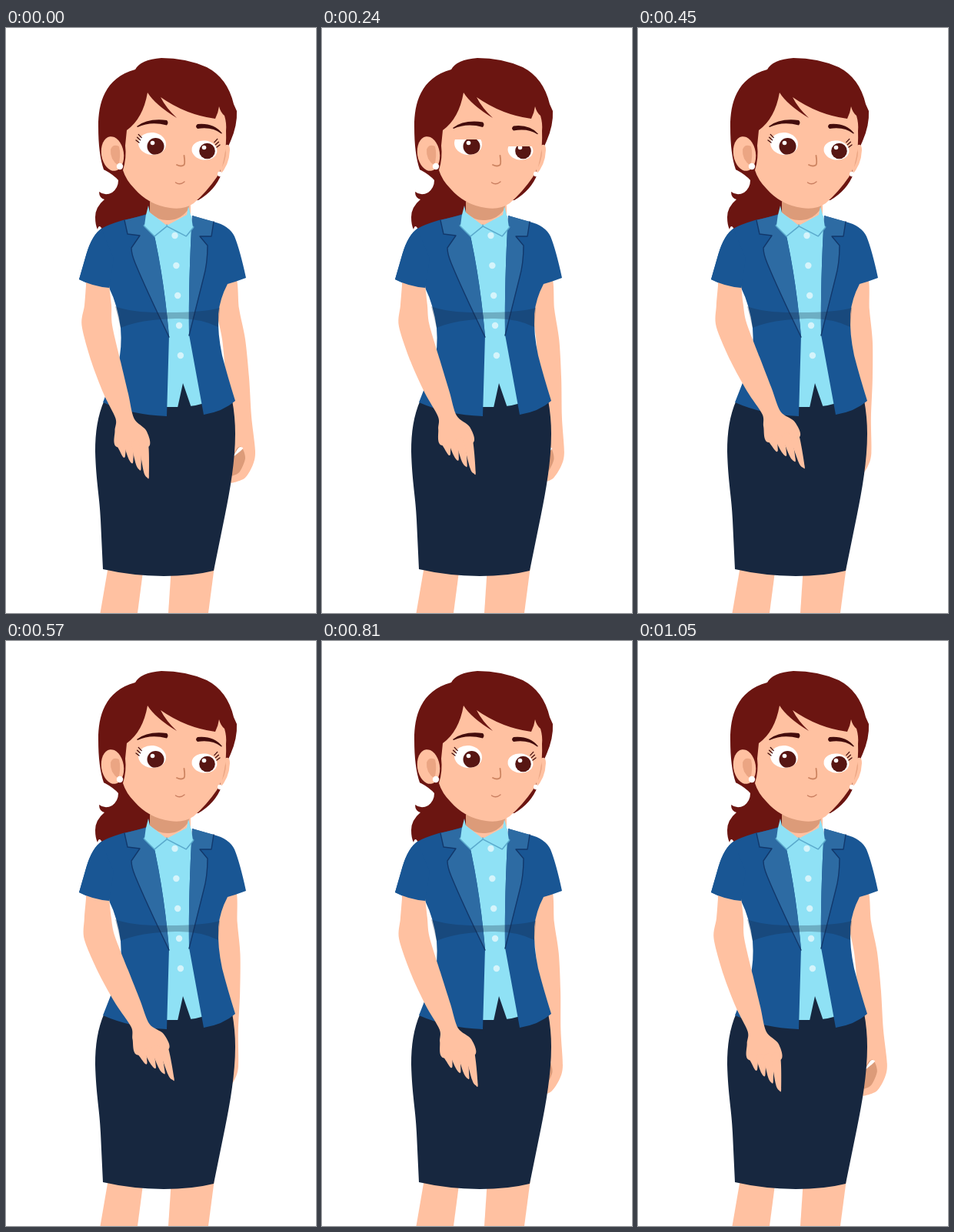
Animation of 403 by 761 pixels, one loop 1.08 s. Source, as an HTML page with a canvas:

```html
<!DOCTYPE html>
<html lang="en">
<head>
<meta charset="utf-8">
<title>Standing woman</title>
<style>
html, body { margin: 0; width: 100%; height: 100%; overflow: hidden; background: #fff; }
canvas { display: block; }
</style>
</head>
<body>
<canvas id="stage" width="403" height="761"></canvas>
<script>
const ctx = document.getElementById('stage').getContext('2d');
const LOOP = 1080, STEP = 30;
const C = {
  hair: '#6b1511', brow: '#430c0c', skin: '#ffc1a1', shade: '#dc9b79', ear: '#eba583',
  jacket: '#195694', lapel: '#2d6ba3', edge: '#12386b',
  shirt: '#8fe1f5', fold: '#5aa9cc', button: '#d5f4fb', skirt: '#17273f', iris: '#571613'
};

function fill(d, color) {
  ctx.fillStyle = color;
  ctx.fill(new Path2D(d));
}

function line(d, color, width) {
  ctx.strokeStyle = color;
  ctx.lineWidth = width;
  ctx.lineCap = ctx.lineJoin = 'round';
  ctx.stroke(new Path2D(d));
}

function oval(x, y, rx, ry, color, turn = 0) {
  ctx.fillStyle = color;
  ctx.beginPath();
  ctx.ellipse(x, y, rx, ry, turn, 0, Math.PI * 2);
  ctx.fill();
}

// Closed smooth curve through the points
function blob(pts, color) {
  const n = pts.length, at = i => pts[(i + n) % n], k = 1 / 7;
  ctx.beginPath();
  ctx.moveTo(...pts[0]);
  for (let i = 0; i < n; i++) {
    const [a, b, c, d] = [at(i - 1), at(i), at(i + 1), at(i + 2)];
    ctx.bezierCurveTo(
      b[0] + (c[0] - a[0]) * k, b[1] + (c[1] - a[1]) * k,
      c[0] - (d[0] - b[0]) * k, c[1] - (d[1] - b[1]) * k, c[0], c[1]);
  }
  ctx.fillStyle = color;
  ctx.fill();
}

// Outline around a spine of [x, y, half width]
function limb(...spine) {
  return [
    ...spine.map(([x, y, h]) => [x - h, y]),
    ...spine.reverse().map(([x, y, h]) => [x + h, y])
  ];
}

// Turns points about a joint, easing in around it
function bend(pts, px, py, angle) {
  return pts.map(([x, y]) => {
    const w = Math.min(1, Math.max(0, (y - py + 25) / 45));
    const c = Math.cos(angle * w), s = Math.sin(angle * w);
    const dx = x - px, dy = y - py;
    return [px + dx * c - dy * s, py + dx * s + dy * c];
  });
}

function drawFarArm(s) {
  const part = (pts, color) => blob(bend(pts, 285, 345, 0.107 * s), color);
  part(limb([284, 322, 14], [288, 365, 15], [296, 405, 15], [301, 455, 15],
    [306, 505, 13], [307, 550, 17], [305, 568, 16], [300, 585, 11], [294, 591, 3]), C.skin);
  part(limb([304, 546, 3], [302, 560, 9], [297, 577, 7], [294, 582, 2]), C.shade);
  part([[296, 557], [303, 545.5], [308, 547]], '#fff');
}

function drawNearArm(s) {
  const part = pts =>
    blob(bend(bend(pts, 154, 510, -0.03 * s), 111, 364, -0.145 * s), C.skin);
  // Upper arm, forearm and palm
  part(limb([118, 318, 13], [119, 335, 15], [119.5, 361, 17.5], [118.3, 387, 19.8],
    [130, 434, 19], [143, 476, 16], [154.5, 508, 12], [162, 524, 20.5], [164.5, 545, 20.5]));
  for (let i = 0; i < 4; i++) {
    const x = 149 + 9.9 * i, tx = 153 + 10.3 * i, ty = 558.5 + 6.5 * i + 0.75 * i * i;
    part([[x - 5, 540], [tx - 5, ty - 8], [tx - 0.5, ty], [tx + 2, ty - 2], [x + 6, 540]]);
  }
}

function drawLower() {
  fill('M133 700L122.5 761H171L179 700Z', C.skin);
  fill('M215 700L211 761H263L271 700Z', C.skin);
  fill('M128 484C119 504 116 526 116 551C117 590 122 612 123 640L126 704Q163 712.5 205 713Q242 713 270 706L285 632C291 602 298 563 298 528Q298 506 294 484Z', C.skirt);
}

function drawTorso() {
  fill('M187 226V246L210 262L240 248V226Z', C.skin);
  fill('M187 226V240Q198 251 212 250Q229 249 238 234V226Z', C.shade);
  fill('M184 244L209 257L241 244L246 400L258 488Q248 491 239 492L224 493L208 493Z', C.shirt);
  fill('M230 462L223 494H241Z', C.skirt);

  // Jacket halves
  fill('M186 241Q168 247 152 250Q132 256 124 261Q112 269 104.5 294L95 327Q112 336 134 338Q145 360 149 390Q151 416 146 436L126 487Q162 503 209 505L212 400Q204 310 186 241Z', C.jacket);
  fill('M242 244Q262 250 270 252Q290 257 297 271Q304 288 312 325Q299 330 288 333Q278 352 276 372Q275 398 281 426Q288 453 298 485Q282 499 257 503L238 399Q237 330 242 244Z', C.jacket);

  // Lapels
  const left = 'M154 250L158 268L174 270L163 286Q163 294 168 306Q182 340 212 402';
  const right = 'M270 252L267 271L252 271L262 283Q262 306 257 324L238 400';
  fill(left + 'Q204 310 186 242Z', C.lapel);
  fill(right + 'Q237 330 242 244Z', C.lapel);
  line(left, C.edge, 1.4);
  line(right, C.edge, 1.4);

  // Shade under the bust
  fill('M142 362Q165 371 210 370Q256 370 278 364L276 389Q252 377 220 378Q174 379 149 390Z', 'rgba(24,40,64,.28)');

  for (let i = 0; i < 5; i++) oval(219.5 + i * 1.85, 270 + i * 39, 4.2, 4.2, C.button);

  // Collar
  const collar = 'M180 257L193 270L209 257L234 270L243 259';
  line(collar, C.fold, 3);
  fill('M185 231Q181 244 180 257L193 270L209 257L187 240Z', C.shirt);
  fill('M237 232Q241 244 243 259L234 270L209 257L235 243Z', C.shirt);
}

function drawSleeve() {
  fill('M124 261Q112 269 104.5 294L95 327Q112 336 134 338L140 300Z', C.jacket);
}

function drawTail() {
  fill('M155 178L127 184Q140 191 146 198Q146 208 138 214Q129 219 121 213Q121 221 128 223Q116 233 116 246Q116 256 119 262Q121 254 125 262L190 246V225Z', C.hair);
}

// Three short strokes fanned along the outer corner
function drawLashes(x, y, side) {
  for (let i = 0; i < 3; i++) {
    const lx = x - side * i * 1.6, ly = y - i * 3.2;
    line(`M${lx} ${ly}l${side * 4} ${-3 - i * 0.6}`, C.brow, 1.3);
  }
}

function drawEye(x, y, rx, ry, px, py, pr, shut) {
  const top = y - ry - 1 + 2 * ry * shut;
  ctx.save();
  if (shut > 0) {
    ctx.beginPath();
    ctx.rect(x - rx - 4, top, 2 * rx + 8, 2 * ry + 8);
    ctx.clip();
  }
  ctx.beginPath();
  ctx.ellipse(x, y, rx, ry, 0.12, 0, Math.PI * 2);
  ctx.clip();
  oval(x, y, rx + 3, ry + 3, '#fff');
  oval(px, py, pr, pr, C.iris);
  oval(px - 4, py - 4.5, 2.8, 2.8, '#fff');
  ctx.restore();
}

function drawHead(shut) {
  // Hair mass and ears
  fill('M127 184Q120 164 120 128C120 98 128 65 168 54Q175 41 202 39Q234 39 261 51Q288 65 296 99L300 108Q301 126 292 147L284 165L280 190Q272 211 250 224L200 226L150 192Z', C.hair);
  oval(138.5, 163.5, 14.5, 22.5, C.skin, -0.15);
  fill('M147 154Q139 150 136 158Q135 171 146 179Q150 166 147 154Z', C.ear);
  fill('M282 155Q291 147 291 159Q290 179 278 191Z', C.skin);
  fill('M285 157Q288 165 281 181Z', C.ear);

  // Face below the fringe
  fill('M157 133Q178 118 184 84Q194 100 222 117Q208 104 201 90Q234 113 272 118Q276 110 277 102Q279 110 284 114Q287 124 286 134C287 158 283 180 274 194Q261 213 244 228Q231 237 213 234Q185 230 167 209Q156 198 152 185Q157 169 155 153Z', C.skin);
  oval(148, 180, 4.2, 4.2, '#fff');
  oval(278, 190, 3, 3.2, '#fff');

  drawEye(190, 150.5, 18, 14.5, 194.5, 154, 11, shut);
  drawEye(258, 159, 16.5, 12.5, 261.5, 160, 10.3, shut);
  if (shut < 0.1) {
    drawLashes(173, 149, -1);
    drawLashes(274, 155, 1);
  }

  // Eyebrows sink with the lids
  const a = 6 * shut, b = 7 * shut, d = 2 * shut;
  fill(`M170 ${128 + a}Q184 ${117 + a} 209 ${120 + b}Q212 ${123 + b} 209 ${126.5 + b}Q188 ${121 + a} 171 ${129 + a}Z`, C.brow);
  fill(`M281 ${137 + d}Q270 ${123 + a} 249 ${125 + b}Q245 ${128 + b} 249 ${131 + b}Q268 ${128 + a} 280 ${137.5 + d}Z`, C.brow);

  line('M231.5 166Q233 176 231.5 178Q228 181 222 178', '#cd8461', 1.8);
  line('M220.5 201Q226 205 232 200', '#c97e60', 1.4);
}

function draw(t) {
  const swing = (1 - Math.cos(2 * Math.PI * t / LOOP)) / 2;
  const shut = t < 125 ? t / 125 : Math.max(0, (300 - t) / 175);
  ctx.fillStyle = '#fff';
  ctx.fillRect(0, 0, 403, 761);
  drawTail();
  drawFarArm(swing);
  drawLower();
  drawTorso();
  drawNearArm(swing);
  drawSleeve();
  drawHead(shut);
}

const start = performance.now();
function tick() {
  const t = Math.max(0, performance.now() - start) % LOOP;
  draw(Math.floor(t / STEP) * STEP);
  requestAnimationFrame(tick);
}
draw(0);
requestAnimationFrame(tick);
</script>
</body>
</html>
```
